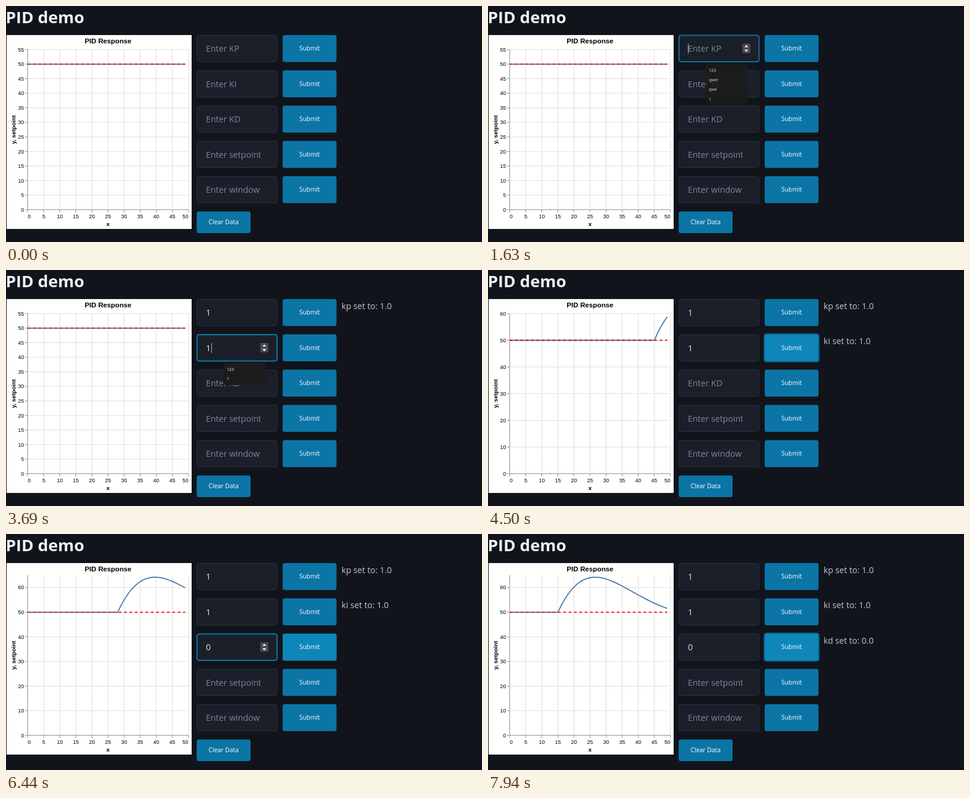
An HTML page that plays this animation: 800 px wide and 398 px high, repeating every 8000 ms.

```html
<!DOCTYPE html>
<html lang="en">
<head>
<meta charset="utf-8">
<title>PID demo</title>
<style>
  html, body { margin: 0; width: 100%; height: 100%; overflow: hidden; background: #11141b; }
  svg { display: block; width: 100%; height: 100%; font-family: "Open Sans", "Noto Sans", sans-serif; }
  .chart { font: 9px "Liberation Sans", Arial, sans-serif; }
  .chart .title { font-size: 11.7px; font-weight: bold; }
  .chart .axis { font-size: 9.9px; font-weight: bold; }
  .field { font-size: 14.2px; }
  .button { font-size: 10.4px; fill: #fff; text-anchor: middle; }
  .menu { font-size: 7.1px; fill: #f4f4f4; }
</style>
</head>
<body>
<svg id="stage" viewBox="0 0 800 398"></svg>
<script>
const LOOP = 8000, ROW = 59.5, FADE = 200;
const stage = document.getElementById('stage');

// Times of each step a user takes in a row, in ms.
const rows = [
  { hint: 'Enter KP', value: '1', reply: 'kp set to: 1.0', matches: ['123', '1'],
    focus: 1450, type: 2200, hover: 2500, click: 2690, answer: 2790, leave: 3060, next: 3200 },
  { hint: 'Enter KI', value: '1', reply: 'ki set to: 1.0', matches: ['123', '1'],
    focus: 3200, type: 3600, hover: 3780, click: 3900, answer: 3990, leave: 4750, next: 5000 },
  { hint: 'Enter KD', value: '0', reply: 'kd set to: 0.0', matches: [],
    focus: 5000, type: 5550, hover: 6220, click: 6580, answer: 6690 },
  { hint: 'Enter setpoint' },
  { hint: 'Enter window' }
];
const history = ['123', 'qwer', 'qwe', '1'];

const clamp = v => Math.max(0, Math.min(1, v));
const between = (t, a, b = Infinity) => t >= a && t < b;
const fade = (t, a, b = Infinity, d = FADE) => clamp((t - a) / d) * (1 - clamp((t - b) / d));

const rect = (x, y, w, h, attrs) => `<rect x="${x}" y="${y}" width="${w}" height="${h}" ${attrs}/>`;
const text = (x, y, s, attrs = '') => `<text x="${x}" y="${y}" ${attrs}>${s}</text>`;
const path = (d, stroke, width = 0.9, attrs = '') =>
  `<path d="${d}" fill="none" stroke="${stroke}" stroke-width="${width}" ${attrs}/>`;

// Damped swing around the setpoint, n samples after the controller starts.
const response = n => n <= 0 ? 50 : 50 + 34 * Math.exp(-0.0581 * n) * Math.sin(0.0827 * n);

function chart(t) {
  const passed = t < 4014 ? 0 : Math.floor((t - 4014) / 114);
  const samples = Array.from({ length: 50 }, (_, i) => response(i - 49 + passed));
  const max = Math.max(55, Math.ceil(Math.max(...samples) / 5) * 5);
  const step = max > 55 ? 10 : 5;
  const top = max % step ? 69.5 : 73.5, base = top + 270;
  const px = x => 36.5 + x * 5.4;
  const py = y => base - y * 270 / max;

  let grid = '', ticks = '', labels = '';
  for (let x = 0; x <= 50; x += 5) {
    grid += `M${px(x)} ${top}V${base}`;
    ticks += `M${px(x)} ${base}v4.5`;
    const anchor = x === 0 ? 'start' : x === 50 ? 'end' : 'middle';
    labels += text(px(x), base + 14, x, `text-anchor="${anchor}"`);
  }
  for (let y = 0; y <= max; y += step) {
    grid += `M36.5 ${py(y)}H306.5`;
    ticks += `M32 ${py(y)}H36.5`;
    labels += text(30.2, py(y) + 3.2, y, 'text-anchor="end"');
  }
  const line = 'M' + samples.map((y, x) => `${px(x)} ${py(y).toFixed(2)}`).join('L');
  const middle = base - 135;

  return `<g class="chart">${rect(1, 49, 311, base - 16.5, 'fill="#fffffe"')}`
    + path(grid, '#ddd') + path(`${ticks}M36.5 ${top}V${base}H306.5`, '#888')
    + labels
    + text(171.5, 62.5, 'PID Response', 'class="title" text-anchor="middle"')
    + text(171.5, base + 27.5, 'x', 'class="axis" text-anchor="middle"')
    + text(0, 0, 'y, setpoint', `class="axis" text-anchor="middle" transform="translate(15.5 ${middle}) rotate(-90)"`)
    + path(line, '#4c78a8', 1.8)
    + path(`M36.5 ${py(50)}H${px(49)}`, '#f00', 1.8, 'stroke-dasharray="4.5 4.5"')
    + '</g>';
}

function button(x, y, w, h, label, lit = 0, ring = 0) {
  const shape = attrs => rect(x, y, w, h, `rx="3.5" ${attrs}`);
  return (ring ? rect(x - 1, y - 1, w + 2, h + 2, `rx="4.5" fill="none" stroke="#0d4f76" stroke-width="2" opacity="${ring}"`) : '')
    + shape('fill="#0b75a6"')
    + (lit ? shape(`fill="#0f86b9" opacity="${lit}"`) : '')
    + text(x + w / 2, y + h / 2 + 3.6, label, 'class="button"');
}

function spinner(y) {
  return rect(427.5, y + 14.5, 13.5, 16, 'rx="1.5" fill="#494a4c"')
    + `<path d="M431 ${y + 20.5}h6.4l-3.2 -3.6zM431 ${y + 24.8}h6.4l-3.2 3.6z" fill="#fff"/>`;
}

function row(r, i, t) {
  const y = 49 + i * ROW;
  const typed = t >= r.type, focused = between(t, r.focus, r.click);
  const glow = fade(t, r.focus, r.click) || 0;
  let out = rect(321, y + 0.5, 134.5, 44.5, 'rx="3.5" fill="#1b1f29" stroke="#2a3040"');
  if (glow) out += rect(321, y + 0.5, 134.5, 44.5, `rx="3.5" fill="none" stroke="#0f76a8" stroke-width="2" opacity="${glow}"`);
  out += text(336, y + 28, typed ? r.value : r.hint,
    `class="field" clip-path="url(#inner)" fill="${typed ? '#e0e3e7' : '#7d8697'}"`);
  if (focused) {
    out += spinner(y);
    const since = t - (typed ? r.type : r.focus);
    if (since % 1000 < 500) out += rect(typed ? 345 : 336, y + 14.5, 0.9, 17, 'fill="#c2c7d0"');
  }
  out += button(465, y, 90.5, 45.5, 'Submit', fade(t, r.hover, r.leave) || 0, fade(t, r.click, r.next) || 0);
  if (t >= r.answer) out += text(564, y + 16.5, r.reply, 'class="field" fill="#c2c7d0"');
  return out;
}

function menu(r, i, t) {
  const narrowed = t >= r.type && r.matches.length;
  const items = narrowed ? r.matches : history;
  const alpha = fade(t, r.focus + 40, r.matches.length ? r.click : r.type, 160);
  if (!alpha) return '';
  const y = 97 + i * ROW;
  return `<g class="menu" opacity="${alpha}">`
    + rect(366, y, 70, items.length * 16.3 + 5, 'rx="3" fill="#1b1c1b"')
    + items.map((s, k) => text(371, y + 13.6 + k * 16.3, s)).join('') + '</g>';
}

function draw(t) {
  stage.innerHTML = '<defs><clipPath id="inner"><rect x="335" y="0" width="93" height="398"/></clipPath></defs>'
    + text(-0.5, 29, 'PID demo', 'font-size="27.6" font-weight="700" fill="#f0f1f3"')
    + chart(t)
    + rows.map((r, i) => row(r, i, t)).join('')
    + button(320.5, 346.5, 90.5, 36.5, 'Clear Data')
    + rows.map((r, i) => r.focus ? menu(r, i, t) : '').join('');
}

const start = performance.now();
function tick() {
  draw((performance.now() - start) % LOOP);
  requestAnimationFrame(tick);
}
tick();
</script>
</body>
</html>
```
